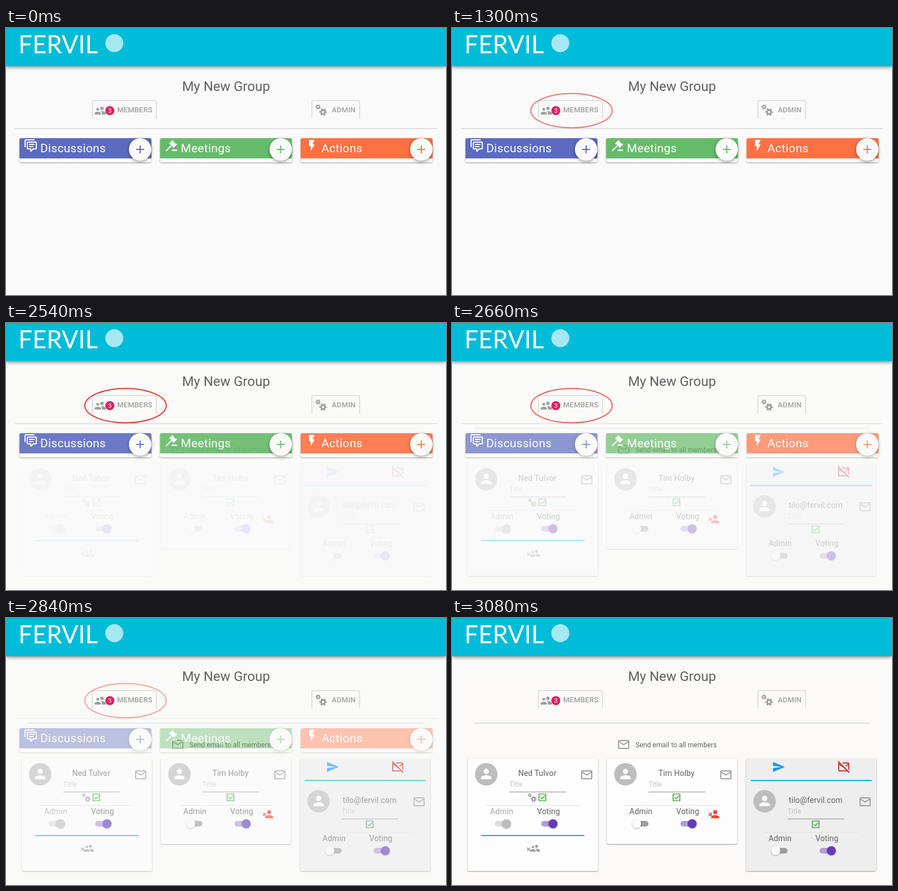
Write an HTML page that moves like this. It is 784 px wide and 475 px high and loops after 4080 ms.

```html
<!DOCTYPE html>
<html lang="en">
<head>
<meta charset="utf-8">
<title>Group members</title>
<style>
html, body { margin: 0; width: 100%; height: 100%; overflow: hidden; background: #fafafa; }
svg { display: block; font-family: Roboto, sans-serif; }
.bar { filter: drop-shadow(0 2px 3px #0007); }
.card { filter: drop-shadow(0 1px 1px #0006); }
.fab { filter: drop-shadow(0 2px 3px #0006); }
.thumb { filter: drop-shadow(0 1px 1px #0005); }
</style>
</head>
<body>
<svg id="stage" width="784" height="475" viewBox="0 0 784 475"></svg>
<script>
const GREY = '#9e9e9e', INK = '#616161', CYAN = '#10b5d0';

// Icons on a 24-unit grid; they take their colour from the enclosing group.
const icons = {
  chat: `<path d="M12 23a1 1 0 0 1-1-1v-3H7a2 2 0 0 1-2-2V7a2 2 0 0 1 2-2h14a2 2 0 0 1 2 2v10a2 2 0 0 1-2 2h-4.1l-3.7 3.7q-.3.3-.7.3zm1-6v3.1l3.1-3.1H21V7H7v10zM3 15H1V3a2 2 0 0 1 2-2h16v2H3zM9 9h10v2H9zM9 13h8v2H9z"/>`,
  gavel: `<path d="M3 21L13 11M9 8.6L14.1 3.5M15.4 15L20.5 9.9" stroke="currentColor" stroke-width="2.4" stroke-linecap="round"/>
    <path d="M9.7 9.2l5-5 6 6-5 5zM12 22v-1q0-2 2-2h6q2 0 2 2v1z"/>`,
  bolt: `<path d="M7 2v11h3v9l7-12h-4l4-8z"/>`,
  mail: `<path d="M4 5h16q1 0 1 1v12q0 1-1 1H4q-1 0-1-1V6q0-1 1-1zM3.5 7L12 12.4L20.5 7" fill="none" stroke="currentColor" stroke-width="2"/>`,
  person: `<circle cx="12" cy="8" r="4"/><path d="M12 14c-2.7 0-8 1.3-8 4v2h16v-2c0-2.7-5.3-4-8-4z"/>`,
  people: `<circle cx="7.5" cy="9.5" r="2.5"/><circle cx="15" cy="8" r="3"/>
    <path d="M7.5 14c-1.8 0-5.5.9-5.5 2.8V19h11v-2.2C13 14.900 9.300 14 7.500 14zM15 13c2.300 0 7 1.200 7 3.500V19h-7v-2.200c0-.9-.3-2.400-2.400-3.500q1.400-.3 2.400-.3z"/>`,
  gear: `<g fill="none" stroke="currentColor"><circle cx="12" cy="12" r="5.700" stroke-width="4.600"/>
    <circle cx="12" cy="12" r="9" stroke-width="4" pathLength="12" stroke-dasharray="1 1" stroke-dashoffset=".5"/></g>`,
  check: `<path d="M4 4h16v16H4zM7.500 12l3.500 3.500 7-7.500" fill="none" stroke="currentColor" stroke-width="2.300"/>`,
  send: `<path d="M2 21l21-9L2 3v7l15 2-15 2z"/>`,
  cross: `<path d="M5 5L19 19M19 5L5 19" stroke="currentColor" stroke-width="5"/>`
};

const icon = (name, x, y, color, size = 24) =>
  `<g transform="translate(${x} ${y}) scale(${size / 24})" fill="${color}" color="${color}">${icons[name]}</g>`;
const text = (s, x, y, size, color, extra = '') =>
  `<text x="${x}" y="${y}" font-size="${size}" fill="${color}" ${extra}>${s}</text>`;
const rect = (x, y, w, h, color, extra = '') =>
  `<rect x="${x}" y="${y}" width="${w}" height="${h}" fill="${color}" ${extra}/>`;
const circle = (x, y, r, color, extra = '') =>
  `<circle cx="${x}" cy="${y}" r="${r}" fill="${color}" ${extra}/>`;
const gears = (x, y, k, color) =>
  icon('gear', x, y, color, 10 * k) + icon('gear', x + 6.500 * k, y + 6.500 * k, color, 15 * k);
const centred = 'text-anchor="middle" letter-spacing=".14"';

function tab(x, w) {
  return `<path d="M${x + 1} 161V132q0-3 3-3h${w - 8}q3 0 3 3v29" fill="none" stroke="#e0e0e0" stroke-width="2"/>`;
}

function chrome() {
  const label = 'font-weight="500" letter-spacing=".2"';
  return rect(0, 0, 784, 68, '#00bcd8', 'class="bar"') +
    text('FERVIL', 22, 45, 44, '#fff', 'font-family="Lato, sans-serif"') +
    circle(193, 27, 16, '#fff', 'opacity=".65"') +
    text('My New Group', 392, 112, 24, INK, 'text-anchor="middle"') +
    tab(153, 116) + icon('people', 156, 135, GREY) + circle(185, 147, 8, '#e01e63') +
    text('3', 185, 151, 11, '#fff', 'text-anchor="middle"') +
    text('MEMBERS', 198, 150, 13, GREY, label) +
    tab(544, 87) + gears(551, 135.500, 1, GREY) + text('ADMIN', 580.500, 150, 13, GREY, label);
}

function column(i, title, color, iconName, iconX) {
  return `<g transform="translate(${24 + i * 250.500} 196)">
    ${rect(0, 0, 235, 43, '#fff', 'rx="3" class="card"')}
    <path d="M0 36V3q0-3 3-3h229q3 0 3 3v33z" fill="${color}"/>
    ${icon(iconName, iconX, 1, '#fff')}
    ${text(title, 37, 25, 21, '#fff', 'letter-spacing=".3"')}
    ${circle(215, 20, 20, '#fafafa', 'class="fab"')}
    <path d="M208 20h14M215 13v14" stroke="${color}" stroke-width="2"/></g>`;
}

function toggle(x, y, on, disabled) {
  const track = disabled ? '#dedede' : on ? '#b19cda' : GREY;
  const thumb = disabled ? '#bdbdbd' : on ? '#673ab7' : '#fafafa';
  return rect(x, y - 5, 24, 10, track, 'rx="5"') +
    circle(on ? x + 21 : x + 3, y, 8, thumb, 'class="thumb"');
}

// Member card; "dy" moves the details below an optional action row.
function member(i, name, { h = 200, fill = '#fdfdfd', dy = 0, owner = false, extra = '' }) {
  return `<g transform="translate(${28 + i * 248} 250)">
    ${rect(0, 0, 232, h, fill, 'rx="3" class="card"')}${extra}
    <g transform="translate(0 ${dy})">
    ${circle(33, 28, 20, '#bdbdbd')}${icon('person', 19, 13.500, '#fff', 28)}
    ${text(name, 124, 31, 14, INK, centred)}
    ${text('Title', 74, 50, 12, '#c2c2c2', 'letter-spacing=".12"')}
    ${rect(74, 59, 101, 1, '#8c8c8c')}
    ${icon('mail', 200, 17, GREY)}
    ${owner ? gears(107, 61.500, .75, GREY) : ''}
    ${icon('check', owner ? 124 : 115, 60, '#4caf50', 18)}
    ${rect(32, 83, 168, 1, '#e0e0e0')}
    ${text('Admin', 60.500, 99, 14, owner ? '#a8a8a8' : INK, centred)}
    ${text('Voting', 144, 99, 14, INK, centred)}
    ${toggle(owner ? 48 : 50, 116, owner, owner)}${toggle(131, 116, true)}
    </g></g>`;
}

function dashboard() {
  return rect(16, 178, 752, 2, '#e0e0e0') +
    column(0, 'Discussions', '#5c6bc0', 'chat', 8) +
    column(1, 'Meetings', '#66bb6a', 'gavel', 8.500) +
    column(2, 'Actions', '#ff7043', 'bolt', 8);
}

function members() {
  const red = '#f44336', dark = '#d32f2f';
  const leave = rect(24, 136, 184, 2, CYAN) +
    icon('cross', 104, 157, GREY, 9) + icon('people', 109.500, 149, GREY, 21);
  const remove = icon('cross', 180, 95, red, 9) + icon('person', 430 - 248, 0, 'none') +
    icon('person', 431 - 248 - 1 + .5, 0, 'none') + icon('person', 182, 88, red, 22);
  const invite = icon('send', 46, 3, '#2196f3') + icon('mail', 162, 3, dark) +
    `<path d="M166 4L185 24" stroke="#eee" stroke-width="3"/><path d="M164 5L184 25" stroke="${dark}" stroke-width="2"/>` +
    rect(8, 38, 216, 2, CYAN);
  return rect(0, 68, 784, 407, '#fbfaf8') + rect(40, 186, 704, 2, '#dedede') +
    icon('mail', 294, 213, GREY) +
    text('Send email to all members', 327, 230, 12, INK, 'letter-spacing=".12"') +
    member(0, 'Ned Tulvor', { owner: true, extra: leave }) +
    member(1, 'Tim Holby', { h: 152, extra: remove }) +
    member(2, 'tilo@fervil.com', { fill: '#eee', dy: 48, extra: invite });
}

const stage = document.getElementById('stage');
stage.innerHTML = rect(0, 0, 784, 475, '#fafafa') + dashboard() +
  `<g id="list">${members()}</g>` + chrome() +
  `<ellipse id="ring" cx="213" cy="147" rx="72.500" ry="30.500" fill="none" stroke="#e0241b" stroke-width="2"/>`;
const list = document.getElementById('list'), ring = document.getElementById('ring');

// Fades advance in ten steps of 60 ms.
const fade = (t, start) => Math.max(0, Math.min(10, Math.floor((t - start) / 60) + 1)) / 10;

function draw() {
  const t = performance.now() % 4080;
  const swap = fade(t, 2540);
  list.setAttribute('opacity', swap);
  ring.setAttribute('opacity', fade(t, 1000) * (1 - swap));
  requestAnimationFrame(draw);
}
draw();
</script>
</body>
</html>
```
